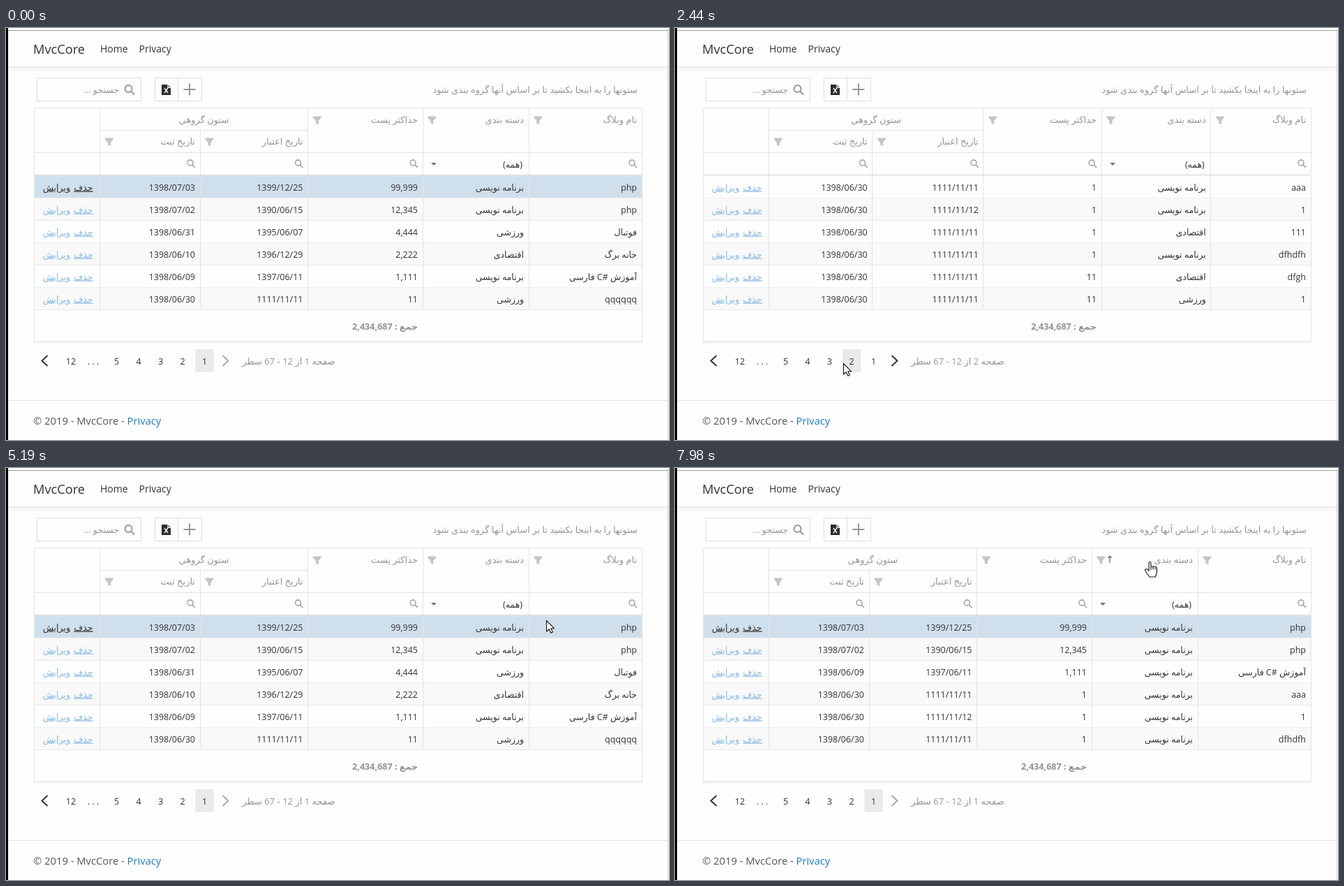
Animation of 950x590 px, one loop 8 s. Source, as an HTML page:

```html
<!DOCTYPE html>
<html lang="fa">
<head>
<meta charset="utf-8">
<title>Blog grid</title>
<style>
  html, body { margin: 0; width: 100%; height: 100%; overflow: hidden; background: #fefefe; }
  svg { display: block; width: 950px; height: 590px; }
  text { font: 12.5px "Open Sans", "DejaVu Sans", sans-serif; fill: #333; }
  .rtl { direction: rtl; }
  .mid { text-anchor: middle; }
  .dim { font-size: 13px; fill: #959595; }
  .find { font-size: 12.5px; }
  .sum { font-size: 12.6px; font-weight: bold; fill: #8f9398; }
  .link { fill: #83b9e8; text-decoration: underline; }
  .link.on { fill: #333; }
  .brand { font-size: 18.2px; }
  .nav { font-size: 14px; }
  .foot { font-size: 14.75px; fill: #555; }
  .blue { fill: #1b7cc4; }
  .line { fill: none; stroke: #e4e4e4; }
  .box { fill: none; stroke: #ddd; }
  .icon { fill: none; stroke: #959595; }
</style>
</head>
<body>
<svg viewBox="0 0 950 590" xmlns="http://www.w3.org/2000/svg">
  <defs>
    <linearGradient id="shade" x2="0" y2="1">
      <stop stop-color="#000" stop-opacity=".05"/>
      <stop offset="1" stop-color="#000" stop-opacity="0"/>
    </linearGradient>
  </defs>
  <rect width="950" height="590" fill="#fefefe"/>
  <rect y="55" width="950" height="9" fill="url(#shade)"/>
  <path class="line" d="M3 55.5H948M3 533.5H948"/>
  <path d="M2 3.5H950" stroke="#9a9a9a"/>
  <path d="M948.5 4V590" stroke="#d0d0d0"/>
  <rect width="3" height="590"/>
  <text class="brand" x="39" y="37">MvcCore</text>
  <text class="nav" x="135" y="35">Home</text>
  <text class="nav" x="190.5" y="35">Privacy</text>

  <rect class="box" x="44.5" y="71.5" width="149" height="33"/>
  <rect class="box" x="213.5" y="71.5" width="33" height="33"/>
  <rect class="box" x="246.5" y="71.5" width="34" height="33"/>
  <text class="rtl dim find" x="162" y="93">جستجو ...</text>
  <g class="icon" stroke-width="2">
    <circle cx="175.5" cy="87" r="5"/><path d="M179 90.5l5 5M254.5 88h17M263 79.5v17"/>
  </g>
  <path d="M223 81h9l4 4v11h-13z" fill="#2d2d2d"/>
  <path d="M232 81v4h4M227 86l5 7m0-7l-5 7" fill="none" stroke="#fff" stroke-width="1.3"/>
  <text class="rtl dim" x="905" y="93">ستونها را به اینجا بکشید تا بر اساس آنها گروه بندی شود</text>

  <g id="grid"></g>
  <g id="pager"></g>

  <text class="foot" x="39" y="567.5">© 2019 - MvcCore - <tspan class="blue">Privacy</tspan></text>

  <g id="cursor" fill="#fff" stroke="#111" stroke-width="1.1" stroke-linejoin="round">
    <path id="arrow" d="M0 0v15.5l3.7-3.3 2.6 5.5 2.5-1.1-2.5-5.4H11z"/>
    <path id="hand" d="M-1.5 13V1.5a1.5 1.5 0 0 1 3 0v5H7q3 .5 3 4v4l-2 7h-8.5l-5-7q-4-5 2-4zM1.500 6.500v5M4.500 7v4M7.500 8v3"/>
  </g>
</svg>
<script>
const $ = id => document.getElementById(id);
const LOOP = 8000, TICK = 76.5, START = 340;
const TOP = 211.5, ROW = 32, LEFT = 40.5, RIGHT = 911;
const PROG = 'برنامه نویسی', SPORT = 'ورزشی', ECO = 'اقتصادی';
const TITLES = ['تاریخ ثبت', 'تاریخ اعتبار', 'حداکثر پست', 'دسته بندی', 'نام وبلاگ'];

// Cells run left to right: registered, valid until, posts, category, name.
const rec = (name, cat, posts = '1', valid = '1111/11/11', reg = '1398/06/30') => [reg, valid, posts, cat, name];
const php1 = rec('php', PROG, '99,999', '1399/12/25', '1398/07/03');
const php2 = rec('php', PROG, '12,345', '1390/06/15', '1398/07/02');
const ball = rec('فوتبال', SPORT, '4,444', '1395/06/07', '1398/06/31');
const home = rec('خانه برگ', ECO, '2,222', '1396/12/29', '1398/06/10');
const learn = rec('آموزش #C فارسی', PROG, '1,111', '1397/06/11', '1398/06/09');
const qqq = rec('qqqqqq', SPORT, '11');
const aaa = rec('aaa', PROG);
const dfh = rec('dfhdfh', PROG);
const dfg = rec('dfgh', ECO, '11');
const ones = rec('111', ECO);
const oneLate = rec('1', PROG, '1', '1111/11/12');
const oneProg = rec('1', PROG);
const oneEco = rec('1', ECO);
const oneSport = rec('1', SPORT, '11');
const firstPage = [php1, php2, ball, home, learn, qqq];

// Each list holds [start time, value] steps.
const views = [
  [0, firstPage],
  [2340, [aaa, oneLate, ones, dfh, dfg, oneSport]],
  [3220, [oneProg, oneProg, oneEco, ones, dfh, dfg]],
  [4320, firstPage],
  [6040, [oneLate, oneSport, oneProg, oneProg, oneEco, oneSport]],
  [7040, [home, ball, qqq, dfh, dfg, aaa]],
  [7980, [php1, php2, learn, aaa, oneLate, dfh]]
];
const pages = [[0, 1], [2030, 2], [2990, 3], [4090, 1]];
const sorts = [[0, null], [5800, { col: 5, dir: 1 }], [6820, { col: 5, dir: -1 }], [7580, { col: 4, dir: 1 }]];

// Pointer moves: start, end, x, y reached.
const moves = [
  [START, 1490, 255, 480], [1950, 2110, 241, 480], [2450, 2740, 227, 480],
  [3220, 3450, 245, 499], [3450, 3800, 279, 483], [4320, 4480, 300, 502],
  [4480, 5150, 774, 218], [5190, 5700, 832, 132], [7040, 7420, 680, 134]
];

const last = (list, t) => list.filter(step => step[0] <= t).pop();
const txt = (x, y, s, cls = '') => `<text x="${x}" y="${y}" class="${cls}">${s}</text>`;
const line = (d, color = '#e4e4e4') => `<path class="line" style="stroke:${color}" d="${d}"/>`;
const rect = (x, y, w, h, fill) => `<rect x="${x}" y="${y}" width="${w}" height="${h}" fill="${fill}"/>`;
const funnel = (x, y) => `<path transform="translate(${x} ${y})" fill="#c3c5c8" d="M-6-5.5H6V-4L2 1V6L-2 4.500V1L-6-4z"/>`;
const lens = x => `<g class="icon" stroke-width="1.3"><circle cx="${x - 1}" cy="193" r="4"/><path d="M${x + 2} 196l4 4"/></g>`;
const pageX = page => 284.5 - 31.5 * (page - 1);

// A long name widens the last column; the others give way evenly.
function columnEdges(rows) {
  const give = rows.includes(learn) ? 0 : 4.7;
  return [LEFT, ...[134.5, 278, 432.5, 597, 749].map((x, i) => x + give * i), RIGHT];
}

function drawGrid(rows, sort) {
  const edges = columnEdges(rows);
  const baseline = r => TOP + 21 + ROW * r;
  let out = '';
  rows.forEach((row, r) => {
    const on = row === php1, y = TOP + ROW * r;
    if (on || r % 2) out += rect(LEFT, y, RIGHT - LEFT, ROW, on ? '#d0dfec' : '#f9f9f9');
    out += line(`M${LEFT} ${y + ROW}H${RIGHT}`, '#e8e8e8');
  });
  out += line(`M${LEFT} 114.5H911.5V450.5H${LEFT}zM${LEFT} 448.5H${RIGHT}M${LEFT} 178.5H${RIGHT}M134.5 146.5H${edges[3]}`);
  for (let i = 1; i < 6; i++) out += line(`M${Math.floor(edges[i]) + .5} ${i === 2 ? 146.5 : 114.5}V403.5`);
  out += line(`M${LEFT} 210.5H${RIGHT}`, '#d5d5d5');

  out += txt((edges[1] + edges[3]) / 2, 136, 'ستون گروهی', 'mid dim');
  TITLES.forEach((title, i) => {
    const left = edges[i + 1], right = edges[i + 2], y = i < 2 ? 163 : 132;
    out += txt(right - 7, y + 4, title, 'rtl dim') + funnel(left + 13.3, y);
    out += title === 'دسته بندی'
      ? txt(right - 9, 199.5, '(همه)', 'rtl') + `<path fill="#777" d="M${left + 12} 193h8l-4 4z"/>`
      : lens(right - 13);
    rows.forEach((row, r) => out += txt(right - 7, baseline(r), row[i], 'rtl'));
  });
  rows.forEach((row, r) => {
    const cls = 'rtl link' + (row === php1 ? ' on' : '');
    out += txt(124.5, baseline(r), 'حذف', cls) + txt(92, baseline(r), 'ویرایش', cls);
  });
  if (sort) {
    const x = edges[sort.col] + 26;
    out += `<path transform="translate(${x} 131) scale(1 ${sort.dir})" class="icon" style="stroke:#666" stroke-width="1.2" d="M0 5V-5m-2.500 3L0-5l2.500 3"/>`;
  }
  return out + txt(edges[4] - 7, 431.5, 'جمع : 2,434,687', 'rtl sum');
}

function drawPager(page) {
  const chevron = (x, dir, color) =>
    `<path fill="none" stroke="${color}" stroke-width="2" d="M${x - 4 * dir} 469l${8 * dir} 7.5l${-8 * dir} 7.5"/>`;
  let out = rect(pageX(page) - 13, 460, 26, 33, '#e9eaeb');
  for (let n = 1; n <= 5; n++) out += txt(pageX(n), 481.5, n, 'mid');
  out += txt(93, 481.5, '12', 'mid');
  out += '<text x="117" y="481.5" letter-spacing="3">...</text>';
  out += chevron(55.5, -1, '#333') + chevron(314.5, 1, page > 1 ? '#333' : '#aaa');
  return out + txt(471.5, 481.5, `صفحه ${page} از 12 - 67 سطر`, 'rtl dim');
}

// Pointer slows sideways towards its goal while it climbs evenly.
function pointerAt(t) {
  let x = 812, y = 576;
  for (const [from, to, goalX, goalY] of moves) {
    const k = Math.min(1, Math.max(0, (t - from) / (to - from)));
    x += (goalX - x) * k * (2 - k);
    y += (goalY - y) * k;
  }
  return { x: Math.round(x), y: Math.round(y) };
}

function isClickable({ x, y }, page) {
  if (y > 115 && y < 179) return true;
  const near = [1, 2, 3, 4, 5].find(n => Math.abs(x - pageX(n)) < 14);
  return y >= 460 && y < 493 && near !== undefined && near !== page;
}

function moveCursor(t, page) {
  $('cursor').style.display = t < START ? 'none' : '';
  const tick = START + Math.floor((t - START) / TICK + .05) * TICK;
  const at = pointerAt(tick), hand = isClickable(at, page);
  $('cursor').setAttribute('transform', `translate(${at.x + .5} ${at.y + .5})`);
  $('hand').style.display = hand ? '' : 'none';
  $('arrow').style.display = hand ? 'none' : '';
}

let shown = '';
function render(t) {
  const view = last(views, t), page = last(pages, t), sort = last(sorts, t);
  const key = [view[0], page[0], sort[0]].join();
  if (key !== shown) {
    $('grid').innerHTML = drawGrid(view[1], sort[1]);
    $('pager').innerHTML = drawPager(page[1]);
    shown = key;
  }
  moveCursor(t, page[1]);
}

const begin = performance.now();
function frame() {
  render((performance.now() - begin) % LOOP);
  requestAnimationFrame(frame);
}
frame();
</script>
</body>
</html>
```
